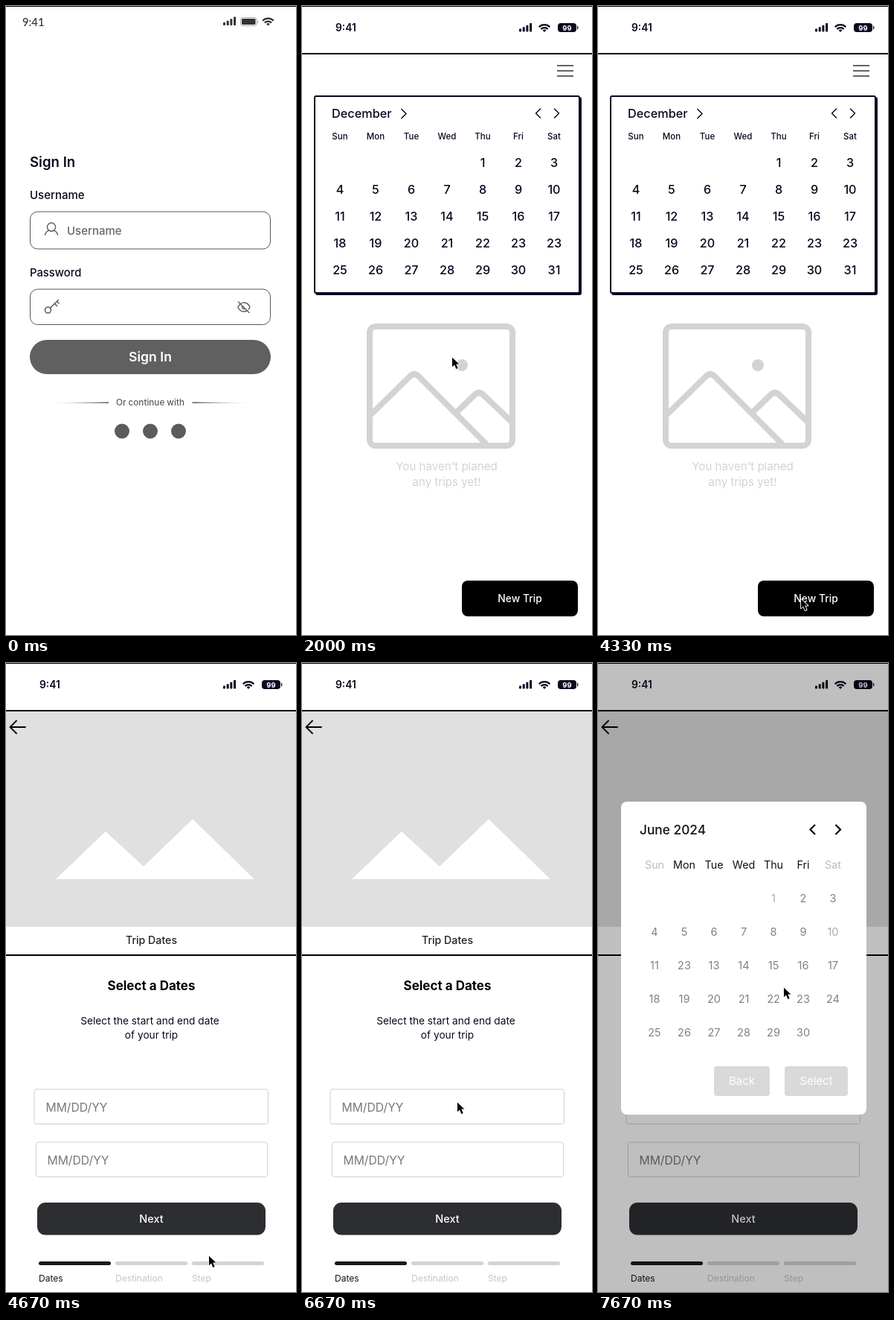
These frames come from a looping animation (390 by 844 pixels, 8 s). An HTML page:

```html
<!DOCTYPE html>
<html lang="en">
<head>
<meta charset="utf-8">
<title>Trip planner</title>
<style>
  html, body { margin: 0; width: 100%; height: 100%; overflow: hidden; background: #fff; }
  svg { display: block; width: 390px; height: 844px; font-family: Inter, sans-serif; }
  .line { fill: none; stroke: currentColor; }
  .round { stroke-linecap: round; stroke-linejoin: round; }
  .mid { text-anchor: middle; }
  .med { font-weight: 500; }
  .semi { font-weight: 600; }
  .navy { color: #080820; fill: #080820; }
  .gray { color: #5c5c5c; fill: #5c5c5c; }
  .pale { color: #d3d3d3; fill: #d3d3d3; }
  .white { fill: #fff; }
</style>
</head>
<body>
<svg viewBox="0 0 390 844">
  <defs>
    <g id="signal">
      <rect x="292" y="30.5" width="3" height="4" rx=".8"/>
      <rect x="296.7" y="28.2" width="3" height="6.3" rx=".8"/>
      <rect x="301.4" y="25.7" width="3" height="8.8" rx=".8"/>
      <rect x="306.1" y="23" width="3" height="11.5" rx=".8"/>
    </g>
    <g id="wifi">
      <path class="line" stroke-width="2.2" d="M318.6 28.2a10.5 10.5 0 0 1 14.8 0M321.3 31a6.6 6.6 0 0 1 9.4 0"/>
      <path d="M326 35l-2.4-2.4a3.4 3.4 0 0 1 4.8 0z"/>
    </g>
    <g id="status" class="navy">
      <text class="semi" x="45" y="34" font-size="13.8">9:41</text>
      <use href="#signal"/>
      <use href="#wifi"/>
      <rect x="344" y="23" width="25" height="12" rx="4"/>
      <rect x="370" y="27" width="1.3" height="4" rx=".6"/>
      <text class="mid white" x="356.5" y="32.6" font-size="9.5" font-weight="700">99</text>
      <rect y="63" width="390" height="2"/>
    </g>
    <linearGradient id="fade">
      <stop stop-color="#666" stop-opacity=".2"/>
      <stop offset="1" stop-color="#555"/>
    </linearGradient>
  </defs>

  <g id="login">
    <g fill="#333" color="#333">
      <text x="22" y="27" font-size="14.8" font-family="Lato, sans-serif" class="med">9:41</text>
      <use href="#signal" y="-8.5"/>
      <use href="#wifi" x="26.5" y="-8.5"/>
      <rect x="315.5" y="15.5" width="21.5" height="11" rx="2.5" fill="none" stroke="#aaa"/>
      <rect x="317" y="17" width="18.5" height="8" rx="1.2"/>
      <rect x="338" y="19.5" width="1" height="3.5" fill="#aaa"/>
    </g>
    <g class="navy med" font-size="15">
      <text class="semi" x="32" y="215.5" font-size="18.6">Sign In</text>
      <text x="32" y="258.5">Username</text>
      <text x="32" y="362.5" font-size="14.8">Password</text>
    </g>
    <g class="line" color="#555">
      <rect x="32.5" y="276" width="323" height="50" rx="10"/>
      <rect x="32.5" y="380" width="323" height="47.5" rx="10"/>
    </g>
    <text class="med" x="82" y="306.5" font-size="15" fill="#686868">Username</text>
    <g class="line round" color="#5c5c5c" stroke-width="1.4">
      <circle cx="61" cy="296.6" r="5.6"/>
      <path d="M52.5 307c1-3.500 3-5 5.300-5.800M69.500 307c-1-3.500-3-5-5.300-5.800"/>
      <g stroke-width="1.6">
        <circle cx="56.500" cy="408" r="4"/>
        <path d="M59.500 405L70.500 394.500M65.500 399.500l3 3M68.500 396.500l2.500 2.500"/>
      </g>
      <path d="M312.500 397l14.500 14.500M316.500 399c-2 1-3.700 2.800-4.700 5 1.600 3.600 4.500 6 8 6 1.500 0 2.800-.4 4-1M318 398.200c4.500-.8 8.300 1.800 10 5.800-.5 1.200-1.200 2.200-2 3.100M317.700 402.300a3 3 0 0 0 4 4"/>
    </g>
    <rect x="32" y="448" width="324" height="46" rx="23" fill="#606060"/>
    <text class="mid semi white" x="194" y="477" font-size="17.600">Sign In</text>
    <path fill="url(#fade)" d="M62 532.400L138 531.500V533Z"/>
    <path fill="url(#fade)" d="M62 532.400L138 531.500V533Z" transform="matrix(-1 0 0 1 388.500 0)"/>
    <g class="gray">
      <text class="mid med" x="194" y="536" font-size="11.700">Or continue with</text>
      <circle cx="156" cy="570.500" r="10"/>
      <circle cx="194" cy="570.500" r="10"/>
      <circle cx="232" cy="570.500" r="10"/>
    </g>
  </g>

  <g id="home">
    <use href="#status"/>
    <path class="line" color="#333" stroke-width="1.300" d="M343 80h22M343 87h22M343 94h22"/>
    <g class="navy">
      <rect x="18" y="122" width="358" height="266" rx="3"/>
      <rect class="line" x="17" y="121" width="356" height="264" rx="2" stroke-width="2" style="fill:#fff"/>
      <text class="med" x="40" y="150" font-size="16.300">December</text>
      <path class="line round" stroke-width="1.500" d="M134 138.500l6 6-6 6M320.500 138l-6 6 6 6M339.500 138l6 6-6 6"/>
      <g id="december" class="mid med"></g>
    </g>
    <g class="pale">
      <g class="line" stroke-width="8">
        <rect x="91" y="430" width="192" height="160" rx="8"/>
        <path d="M92 549L145 497Q151 491 157 497L248 588M208 545L232 522Q238 516 244 522L282 558"/>
      </g>
      <circle cx="215" cy="482" r="8"/>
      <g class="mid" font-size="15.100">
        <text x="194.500" y="623">You haven't planed</text>
        <text x="194.500" y="644">any trips yet!</text>
      </g>
    </g>
    <rect x="215" y="771" width="156" height="48" rx="8"/>
    <text class="mid med white" x="293" y="800" font-size="13.900">New Trip</text>
  </g>

  <g id="dates">
    <use href="#status"/>
    <rect y="65" width="390" height="289" fill="#e0e0e0"/>
    <path class="white" d="M67 290L134 226L185 273L251 209.500L334 290Z"/>
    <path class="line round" stroke-width="1.800" d="M26 86H5.500M14 77.500L5.500 86L14 94.500"/>
    <rect y="391" width="390" height="2"/>
    <g class="mid">
      <text class="med" x="195.500" y="377" font-size="14.200" fill="#222">Trip Dates</text>
      <text x="195.500" y="439" font-size="17" font-weight="700">Select a Dates</text>
      <g class="navy" font-size="13.700">
        <text x="193.500" y="485">Select the start and end date</text>
        <text x="195.500" y="504">of your trip</text>
      </g>
    </g>
    <g class="line" color="#d0d0d0">
      <rect x="38" y="572" width="314.500" height="46.500" rx="3"/>
      <rect x="40.500" y="643" width="311" height="46.500" rx="3"/>
    </g>
    <g fill="#777" font-size="15.700">
      <text x="53.500" y="601.500">MM/DD/YY</text>
      <text x="55.500" y="672.500">MM/DD/YY</text>
    </g>
    <rect x="42" y="724" width="307" height="43.500" rx="11" fill="#2d2e32"/>
    <text class="mid med white" x="195.500" y="750.500" font-size="14.500">Next</text>
    <g fill="#d0d4da">
      <rect x="44" y="803" width="97" height="5" rx="2.500" fill="#1a1a1c"/>
      <rect x="147" y="803" width="97" height="5" rx="2.500"/>
      <rect x="250" y="803" width="97" height="5" rx="2.500"/>
    </g>
    <g font-size="12" fill="#c6c6c6">
      <text x="44" y="830" fill="#111">Dates</text>
      <text x="147" y="830">Destination</text>
      <text x="250" y="830">Step</text>
    </g>
  </g>

  <g id="picker">
    <rect width="390" height="844" fill-opacity=".25"/>
    <rect class="white" x="31" y="186" width="330" height="420" rx="8"/>
    <text class="med" x="56" y="230" font-size="17.300" fill="#111">June 2024</text>
    <path class="line" stroke-width="2.200" d="M292 217l-6.500 6.500 6.500 6.500M319.500 217l6.500 6.500-6.500 6.500"/>
    <g id="june" class="mid"></g>
    <g fill="#d9d9d9">
      <rect x="156" y="541" width="75" height="40" rx="4"/>
      <rect x="251" y="541" width="85" height="40" rx="4"/>
    </g>
    <g class="mid white" font-size="15">
      <text x="193.500" y="566">Back</text>
      <text x="293.500" y="566">Select</text>
    </g>
  </g>

  <rect width="390" height="1"/>
  <path id="cursor" d="M1 1.800V14.200L4 11.400L6.400 17L8.600 16.100L6.300 10.500H10.300Z"
    stroke="#fff" stroke-width="1.800" stroke-linejoin="round" paint-order="stroke"
    style="filter:drop-shadow(0 .6px .6px rgba(0,0,0,.35))"/>
</svg>
<script>
const el = id => document.getElementById(id);
const week = ['Sun', 'Mon', 'Tue', 'Wed', 'Thu', 'Fri', 'Sat'];

// Month grid whose first day falls on a Thursday; odd holds misnumbered days.
function month(id, o) {
  const put = (text, col, y, size, fill) =>
    `<text x="${o.x + col * o.dx}" y="${y}" font-size="${size}" fill="${fill}">${text}</text>`;
  let out = week.map((name, i) => put(name, i, o.headY, o.headSize, o.headFill(i))).join('');
  for (let day = 1; day <= o.days; day++) {
    const cell = day + 3;
    out += put(o.odd[day] || day, cell % 7, o.y + Math.floor(cell / 7) * o.dy, o.size, o.fill(day));
  }
  el(id).innerHTML = out;
}

month('december', {
  x: 51, dx: 48, y: 216, dy: 36, size: 16.2, headY: 179, headSize: 11.5,
  days: 31, odd: { 17: 17, 24: 23 }, headFill: () => '#080820', fill: () => '#080820'
});
month('june', {
  x: 76, dx: 40, y: 321, dy: 45, size: 14.5, headY: 276, headSize: 14.3,
  days: 30, odd: { 12: 23 },
  headFill: i => i % 6 ? '#111' : '#bbb',
  fill: day => day === 1 || day === 10 ? '#aaa' : '#808080'
});

const loop = 8000;
// Pointer stops: time, x, y. It jumps from one to the next.
const stops = [
  [670, 232, 672], [1000, 174, 466], [1330, 170, 489], [1670, 201, 470],
  [2670, 253, 499], [3000, 364, 444], [3330, 359, 444], [3670, 310, 499],
  [4000, 311, 570], [4330, 272, 794], [5330, 212, 703], [5670, 175, 603],
  [6000, 159, 526], [6330, 196, 570], [6670, 208, 588], [7330, 256, 503],
  [7670, 249, 434]
];
const screens = { login: [0, 2000], home: [2000, 4670], dates: [4670, loop], picker: [7000, loop] };
const show = (id, on) => el(id).setAttribute('visibility', on ? 'visible' : 'hidden');

function draw(now) {
  const t = now % loop;
  for (const id in screens) show(id, t >= screens[id][0] && t < screens[id][1]);
  const stop = stops.filter(s => s[0] <= t).pop();
  show('cursor', stop);
  if (stop) el('cursor').setAttribute('transform', `translate(${stop[1]} ${stop[2]})`);
}

let start;
function tick(now) {
  start ??= now;
  draw(now - start);
  requestAnimationFrame(tick);
}
draw(0);
requestAnimationFrame(tick);
</script>
</body>
</html>
```
